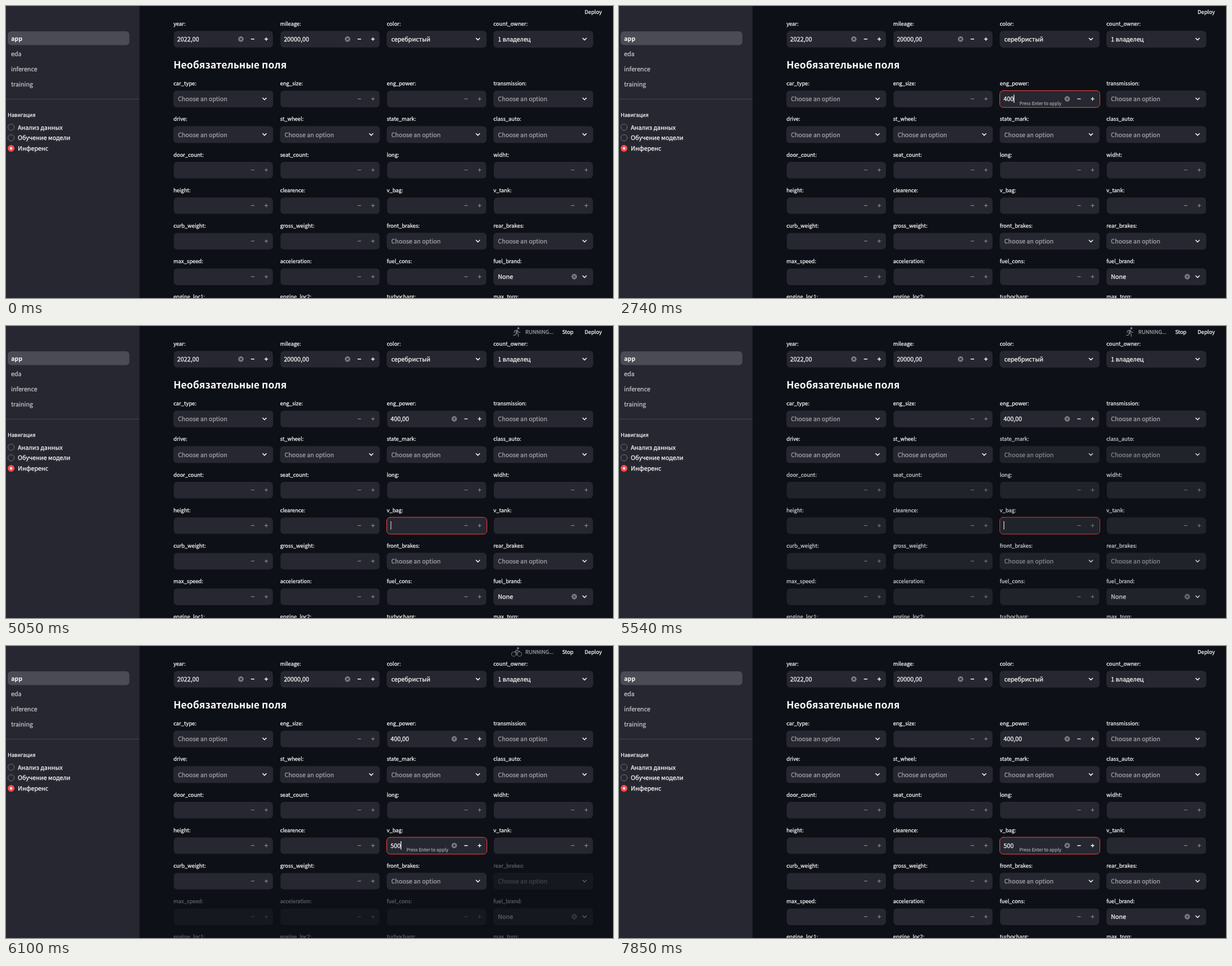
An HTML page with a canvas that plays this animation: 1080x519 px, repeating every 8000 ms.

```html
<!DOCTYPE html>
<html lang="ru">
<head>
<meta charset="utf-8">
<style>
  html, body { margin: 0; width: 100%; height: 100%; overflow: hidden; background: #0d1016; }
  canvas { display: block; width: 1080px; height: 519px; }
</style>
</head>
<body>
<canvas width="1080" height="519"></canvas>
<script>
const ctx = document.querySelector('canvas').getContext('2d');
const LOOP = 8000;
const BG = '#0d1016', PANEL = '#262730', WHITE = '#fafafa', MUTED = '#a3a4a8', RED = '#ff4b4b';
const FAMILY = '"Noto Sans CJK JP", "Noto Sans CJK SC", "Noto Sans CJK", "Open Sans", sans-serif';
const BODY = 10.75, SMALL = 9.4, HINT = 8.06, TITLE = 17.65;
const LEFT = 297.7, PITCH_X = 189.8, PITCH_Y = 63.2, FIELD_W = 177.7, FIRST_ROW = 165.3;

const required = [
  { label: 'year:', value: '2022,00' },
  { label: 'mileage:', value: '20000,00' },
  { label: 'color:', select: true, value: 'серебристый' },
  { label: 'count_owner:', select: true, value: '1 владелец' }
];
// A leading * marks a select box.
const optional = `*car_type eng_size eng_power *transmission
  *drive *st_wheel *state_mark *class_auto
  door_count seat_count long widht
  height clearence v_bag v_tank
  curb_weight gross_weight *front_brakes *rear_brakes
  max_speed acceleration fuel_cons *fuel_brand
  engine_loc1 engine_loc2 turbocharg max_torq`.split(/\s+/).map(name => ({
    label: name.replace('*', '') + ':', select: name[0] === '*'
  }));
optional.find(f => f.label === 'fuel_brand:').value = 'None';

const typed = {
  'eng_power:': { focus: 500, blur: 4490, digits: '400', keys: [1690, 2530, 2740], final: '400,00' },
  'v_bag:': { focus: 4490, blur: LOOP, digits: '500', keys: [5610, 5820, 6030] }
};

const ramp = (t, a, b) => Math.min(1, Math.max(0, (t - a) / (b - a)));
const gray = alpha => `rgba(250,250,250,${alpha})`;

function text(str, x, y, size = BODY, color = WHITE, weight = 400, align = 'left') {
  ctx.font = `${weight} ${size}px ${FAMILY}`;
  ctx.textAlign = align;
  ctx.fillStyle = ctx.strokeStyle = color;
  ctx.fillText(str, x, y);
  // A hairline outline gives regular text its slightly heavier look.
  if (weight === 400) {
    ctx.lineWidth = 0.25;
    ctx.strokeText(str, x, y);
  }
}

function box(x, y, w, h, r, color) {
  ctx.beginPath();
  ctx.roundRect(x, y, w, h, r);
  ctx.fillStyle = color;
  ctx.fill();
}

function disc(x, y, r, color) {
  ctx.beginPath();
  ctx.arc(x, y, r, 0, 7);
  ctx.fillStyle = color;
  ctx.fill();
}

function ring(x, y, r, color, width) {
  ctx.beginPath();
  ctx.arc(x, y, r, 0, 7);
  ctx.strokeStyle = color;
  ctx.lineWidth = width;
  ctx.stroke();
}

// Each line is a flat list x0, y0, x1, y1, ... relative to (x, y).
function lines(x, y, color, width, ...paths) {
  ctx.beginPath();
  for (const p of paths)
    for (let i = 0; i < p.length; i += 2)
      ctx[i ? 'lineTo' : 'moveTo'](x + p[i], y + p[i + 1]);
  ctx.strokeStyle = color;
  ctx.lineWidth = width;
  ctx.stroke();
}

function clearIcon(x, y) {
  disc(x, y, 4.8, '#7e7f85');
  lines(x, y, PANEL, 1.1, [-1.7, -1.7, 1.7, 1.7], [1.7, -1.7, -1.7, 1.7]);
}

function steppers(x, y, enabled) {
  const color = gray(0.45 + 0.55 * enabled), width = 1.2 + 0.2 * enabled;
  lines(x + 141.2, y, color, width, [-2.6, 0, 2.6, 0]);
  lines(x + 165.3, y, color, width, [-2.6, 0, 2.6, 0], [0, -2.6, 0, 2.6]);
}

// Blink phase counts from the last key press or focus.
function caretAlpha(since) {
  const p = since % 1120;
  return p < 800 ? 1 - ramp(p, 510, 690) : ramp(p, 900, 1050);
}

function selectField(f, x, y) {
  box(x, y - 15, FIELD_W, 30, 6, PANEL);
  text(f.value || 'Choose an option', x + 8.2, y + 4, BODY, f.value ? WHITE : MUTED);
  if (f.value === 'None') clearIcon(x + 144, y - 0.2);
  lines(x + 162.3, y - 0.2, WHITE, 1.5, [-3.2, -1.6, 0, 1.6, 3.2, -1.6]);
}

function numberField(f, x, y, t) {
  box(x + 0.8, y - 14.7, FIELD_W - 1.3, 29.4, 6, PANEL);
  const input = typed[f.label];
  let value = f.value || '', enabled = value ? 1 : 0;
  if (input) {
    const count = input.keys.filter(k => t >= k).length;
    const active = t >= input.focus && t < input.blur;
    value = t >= input.blur ? input.final : input.digits.slice(0, count);
    enabled = ramp(t, input.keys[0] - 40, input.keys[0] + 200);
    const glow = ramp(t, input.focus - 20, input.focus + 170) * (1 - ramp(t, input.blur - 20, input.blur + 150));
    if (glow) {
      ctx.globalAlpha = glow;
      ctx.beginPath();
      ctx.roundRect(x + 0.2, y - 14.9, FIELD_W + 0.3, 29.9, 6);
      ctx.strokeStyle = RED;
      ctx.lineWidth = 1;
      ctx.stroke();
      ctx.globalAlpha = 1;
    }
    if (active) {
      if (count) text('Press Enter to apply', x + 109.6, y + 10.5, HINT, MUTED, 400, 'right');
      ctx.font = `400 ${BODY}px ${FAMILY}`;
      const caretX = x + 6.9 + ctx.measureText(value).width;
      const last = count ? input.keys[count - 1] : input.focus;
      box(caretX, y - 7.8, 1.3, 14.6, 0, gray(caretAlpha(t - last)));
    }
  }
  if (value) {
    text(value, x + 6.9, y + 4);
    clearIcon(x + 120.2, y - 0.2);
  }
  steppers(x, y - 0.2, enabled);
}

function field(f, col, y, t, fade = 0) {
  const x = LEFT + col * PITCH_X;
  text(f.label, x + 0.2, y - 24.1, SMALL);
  (f.select ? selectField : numberField)(f, x, y, t);
  if (fade) box(x - 2, y - 38, FIELD_W + 4, 55, 0, `rgba(13,16,22,${fade})`);
}

function sidebar() {
  box(0, 0, 237.6, 519, 0, PANEL);
  box(3, 45, 216.5, 24.4, 6, '#4a4b54');
  ['app', 'eda', 'inference', 'training'].forEach((name, i) =>
    text(name, 9, 61.6 + i * 27.1, BODY, i ? '#c5c6c8' : WHITE, i ? 400 : 700));
  box(0, 165.2, 237.6, 0.9, 0, gray(0.2));
  text('Навигация', 3, 196.7, SMALL);
  ['Анализ данных', 'Обучение модели', 'Инференс'].forEach((name, i) => {
    const y = 215.5 + i * 18.75;
    if (i < 2) ring(9, y, 5.6, gray(0.4), 0.9);
    else { disc(9, y, 6, RED); disc(9, y, 2.2, WHITE); }
    text(name, 21, y + 4);
  });
}

function runner(color) {
  disc(911.6, 4, 2, color);
  lines(909, 8, color, 2.6, [0.5, 0, -1, 4.5]);
  lines(909, 8, color, 1.4, [0, -0.5, -4, 0.5, -5, 3.5], [1, 0, 2.6, 2.8, 5.5, 3],
    [-0.5, 4, 2.5, 6.5, 2.5, 10.5], [-1, 4.5, -2.5, 8, -6, 8.5]);
}

function cyclist(color) {
  disc(911, 4, 1.9, color);
  ring(903.4, 14.4, 3.9, color, 1.1);
  ring(913.6, 14.4, 3.9, color, 1.1);
  lines(909, 7, color, 1.5, [0, 0, -3.4, 2.8, 0.2, 5.2, 0, 9], [0, 0, 2, 2.2, 5, 2.4]);
}

function header(t) {
  text('Deploy', 1029.6, 14.1, SMALL);
  if (t < 5050 || t >= 6450) return;
  (t < 5880 ? runner : cyclist)('#74767c');
  text('RUNNING...', 924, 14.1, SMALL, MUTED);
  text('Stop', 989.4, 14.1, SMALL);
}

function draw(t) {
  box(0, 0, 1080, 519, 0, BG);
  sidebar();
  header(t);
  required.forEach((f, i) => field(f, i, 59, t));
  text('Необязательные поля', 298, 111.2, TITLE, WHITE, 700);

  // Stale fields dim until the rerun reaches them one by one.
  const stale = 0.65 * ramp(t, 5050, 6070) ** 1.7;
  const fresh = 6 + Math.min(13, Math.floor((t - 5530) / 43)) + Math.max(0, Math.floor((t - 6290) / 15));
  optional.forEach((f, i) =>
    field(f, i % 4, FIRST_ROW + Math.floor(i / 4) * PITCH_Y, t, i >= fresh ? stale : 0));
}

ctx.textRendering = 'geometricPrecision';
ctx.lineCap = ctx.lineJoin = 'round';
const start = performance.now();
function tick() {
  draw((performance.now() - start) % LOOP);
  requestAnimationFrame(tick);
}
tick();
</script>
</body>
</html>
```
